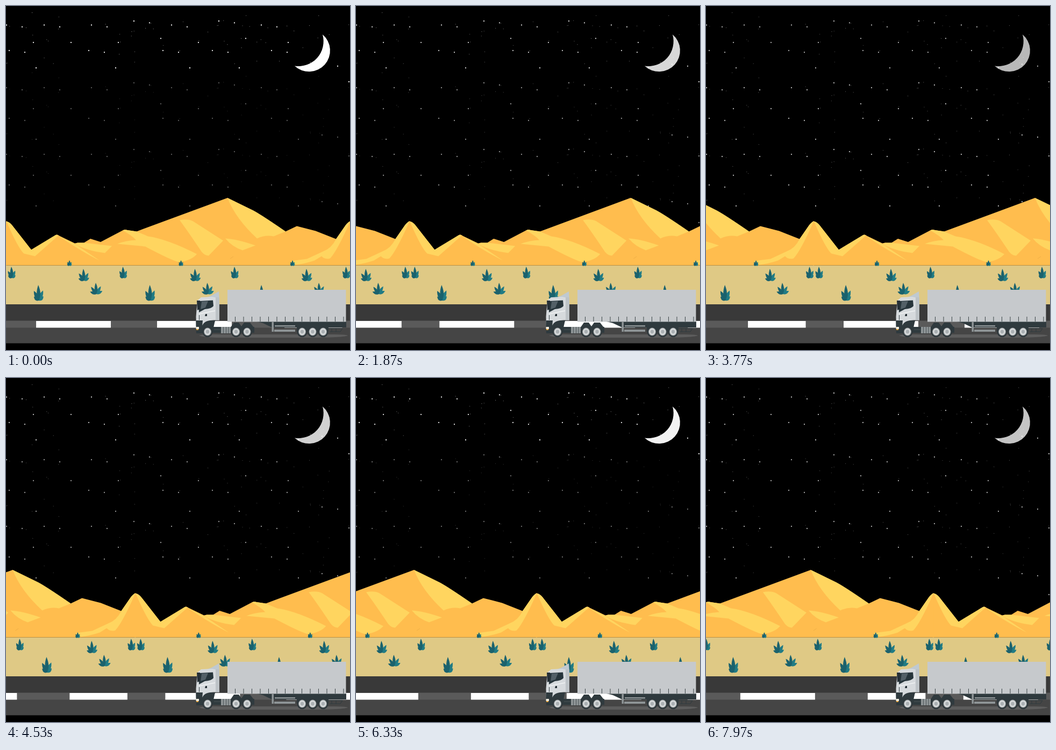
These frames come from a looping animation (640 by 640 pixels, 8 s). An HTML page:

```html
<!DOCTYPE html>
<html lang="en">
<head>
<meta charset="utf-8">
<title>Night truck</title>
<style>
  html, body { margin: 0; height: 100%; overflow: hidden; background: #000; }
  svg { display: block; width: 100vw; height: 100vh; }
</style>
</head>
<body>
<svg viewBox="0 0 640 640">
  <rect width="640" height="640"/>
  <path id="moon" fill="#fff" d="M589 53A39.150 39.150 0 1 1 537 111.500A46.500 46.500 0 0 0 589 53"/>
  <g id="highStars" fill="#fff"></g>
  <g id="lowStars" fill="#fff"></g>

  <rect y="482.500" width="640" height="73" fill="#dfc985"/>
  <rect y="555" width="640" height="31" fill="#393939"/>
  <rect y="585.500" width="640" height="13.500" fill="#5a5a5a"/>
  <rect y="598.500" width="640" height="29" fill="#454545"/>

  <g id="scenery">
    <g id="tile">
      <g transform="translate(0 -.6)">
        <path fill="#ffbd4e" d="M-1 483V401H0Q6 402 11 408L47 454L90 428Q95 424 99 428L128 442L133 441H145L157 433.500L176 439.500L217 418Q221 416 226 417.500L243 420L412 357.500L460 381Q475 389 520 420L541 410L576 419L614 434L632 408Q637 402 641 401V483Z"/>
        <g fill="#ffd55f">
          <path d="M0 401Q6 402 11 408L47 454L90 428Q95 424 97 428L54 466L33 461Q22 450 2 404Z"/>
          <path d="M640 401Q637 402 632 408L614 434Q606 451 590 457L560 471L529 475L539 482Q556 480 574 474L587 466Q594 473 603 470Q616 456 639 404Z"/>
          <path d="M97 428L128 443L174 474Q145 460 97 428Z"/>
          <path d="M128 443L133 441H145L197 447L184 460Q150 456 128 443Z"/>
          <path d="M217 418Q221 416 226 417.500L243 420L264 429Q300 434 355 462Q345 474 322 477Q310 475 259 448L207 443Q222 437 242 436Q235 428 217 418Z"/>
          <path d="M323 399Q338 396 348 401L404 437L377 465Q370 465 364 458Q340 422 323 399Z"/>
          <path d="M412 357.500L460 381Q475 389 520 420L498 429Q482 426 467 433Q427 396 412 357.500Z"/>
          <path d="M408 433Q429 434 464 446L440 455Q420 448 408 433Z"/>
        </g>
      </g>
      <path stroke="#e9a844" stroke-width=".7" d="M417 470L423 466"/>
      <g id="plants"></g>
      <path fill="#fff" d="M56 586H195V598.500H56ZM281 586H420V598.500H281ZM518 586H625.500V598.500H518Z"/>
    </g>
    <use href="#tile" x="-640"/>
  </g>

  <g id="truck">
    <path fill="#5d5d5d" d="M359 613Q370 610 400 611H610Q632 611 636 613Q630 617 560 617H400Q370 617 359 613Z"/>
    <g fill="#2f3a3e">
      <path d="M466 587H633V598H495L478 590Z"/>
      <path d="M541 597H600V605H541ZM384 597H462V608H384Z"/>
      <path d="M353 585H390L384 592V609H354Z"/>
      <path d="M417 599L424 589H433L438 596L443 589H454L461 598Z"/>
    </g>
    <path fill="none" stroke="#2f3a3e" d="M600 600H626L622 606H602M606 600V606M614 600V606"/>
    <path fill="#8e9496" d="M494.500 588H498V606H494.500ZM500 594H538V596.500H500ZM499 602H538V606H499ZM400 597H418V609H400Z"/>
    <path fill="none" stroke="#4b5457" d="M404.500 597V609M409.500 597V609M414 597V609M387 602H399"/>
    <rect x="412" y="528" width="220.500" height="59.500" fill="#c6c9cc"/>
    <path id="ticks" stroke="#3b4447"/>
    <path fill="#bfc9d1" d="M364 546L382 539L396 531L397 547Z"/>
    <path fill="#d6dadd" d="M356 548L363 542L384 541L397 544V584.500H386L380 585L371 590L366 597H354L353.500 578Z"/>
    <path fill="#bdc3c7" d="M390 542H397V584.500H390Z"/>
    <path fill="#27353b" d="M359 549L385 547.500L386 558Q383 563 370 564L359 570Z"/>
    <path fill="#536067" d="M364 550L376 549L371 561L362 564Z"/>
    <path fill="#263036" d="M355 548H361V564L356 566Z"/>
    <path fill="none" stroke="#f0f2f3" stroke-width="1.500" d="M359 573L389 567"/>
    <path fill="#263036" d="M371 573H374V577H370Z"/>
    <path stroke="#394449" d="M359.500 575V584"/>
    <path fill="#2f3a3e" d="M354 585H366L365 597H354ZM364 598Q367 586 380 585H389L385 603Z"/>
    <path fill="#f3efe0" d="M353.500 597H359V601H353.500Z"/>
    <path fill="#e8a23a" d="M354 601H358V603H354Z"/>
    <g id="wheels"></g>
  </g>
</svg>
<script>
const LOOP = 8000, SPEED = 0.05305;
const $ = id => document.getElementById(id);

function add(parent, tag, attrs) {
  const el = document.createElementNS('http://www.w3.org/2000/svg', tag);
  for (const key in attrs) el.setAttribute(key, attrs[key]);
  parent.append(el);
}

let seed = 7;
const random = () => (seed = seed * 16807 % 2147483647) / 2147483647;

// The star pattern repeats every 124 px; its top copy is squeezed.
function star(x, y, r = 1.15, opacity = 1) {
  const dot = (group, cy) =>
    add($(group), 'circle', { cx: x, cy, r, 'fill-opacity': opacity });
  dot('highStars', 28 + (y - 143) * 0.83);
  dot('lowStars', y);
  dot('lowStars', y + 124);
}

function trio(x, y) {
  star(x, y);
  star(x + 29, y + 4);
  star(x + 50, y + 39);
}

for (let i = 0; i < 7; i++)
  trio(1 + 79 * i - (i % 3 === 1 ? 9 : 0), i > 2 && i % 2 ? 143 : 152);
for (const x of [6, 154, 292, 384, 494]) trio(x, 209);
trio(588, 240);
for (let i = 0; i < 60; i++)
  star(random() * 640, 124 + random() * 124, 0.6, 0.5);

// Blades fan out from the base; outer ones are shorter by the taper.
function plant(x, y, { height, spread, taper, lean = 0 }) {
  const width = 1.2 + height / 9;
  [-1, 1, -0.5, 0.5, 0].forEach((k, i) => {
    const len = height * (1 - taper * Math.abs(k));
    add($('plants'), 'path', {
      d: `M0 0C${-width} ${-len * 0.3} ${-width} ${-len * 0.6} 0 ${-len}C${width} ${-len * 0.6} ${width} ${-len * 0.3} 0 0`,
      fill: i % 2 ? '#217b84' : '#1b626d',
      transform: `translate(${x} ${y}) rotate(${lean + spread * k})`
    });
  });
}

for (let i = 0; i < 4; i++) {
  const shift = 207.5 * i;
  plant(11 + shift, 506, { height: 21, spread: 55, taper: 0.6, lean: -3 });
  if (i === 3) break;
  plant(118 + shift, 483, { height: 10, spread: 60, taper: 0.5 });
  plant(145 + shift, 511, { height: 22, spread: 65, taper: 0.5, lean: -3 });
  plant(168 + shift, 536, { height: 21, spread: 66, taper: 0.4, lean: -3 });
  plant(61 + shift, 548, { height: 29, spread: 50, taper: 0.6, lean: -2 });
}

let ticks = '';
for (let x = 426.5; x < 632; x += 15.5) ticks += `M${x} 578V587`;
$('ticks').setAttribute('d', ticks);

function wheel(cx) {
  const ring = (r, fill) =>
    add($('wheels'), 'ellipse', { cx, cy: 606, rx: r * 0.93, ry: r, fill });
  ring(10.3, '#2f383c');
  ring(7.6, '#8e9597');
  ring(6.4, '#d6d9da');
  ring(3.4, '#aab0b3');
}
wheel(375);
for (let i = 0; i < 2; i++) wheel(428 + 20.5 * i);
for (let i = 0; i < 3; i++) wheel(551 + 19.5 * i);

// Moonlight fades from full to 70 % and back.
function glowAt(t) {
  const fade = t < 3600 ? t / 3600 : t < 5900 ? (5900 - t) / 2300 : (t - 5900) / 2700;
  return 1 - 0.3 * fade;
}

function draw(now) {
  const t = now % LOOP, glow = glowAt(t);
  $('scenery').setAttribute('transform', `translate(${t * SPEED} 0)`);
  $('moon').setAttribute('opacity', glow);
  $('highStars').setAttribute('opacity', glow);
  $('lowStars').setAttribute('opacity', 0.35 + 1.3 * (1 - glow));
  requestAnimationFrame(draw);
}
draw(performance.now());
</script>
</body>
</html>
```
